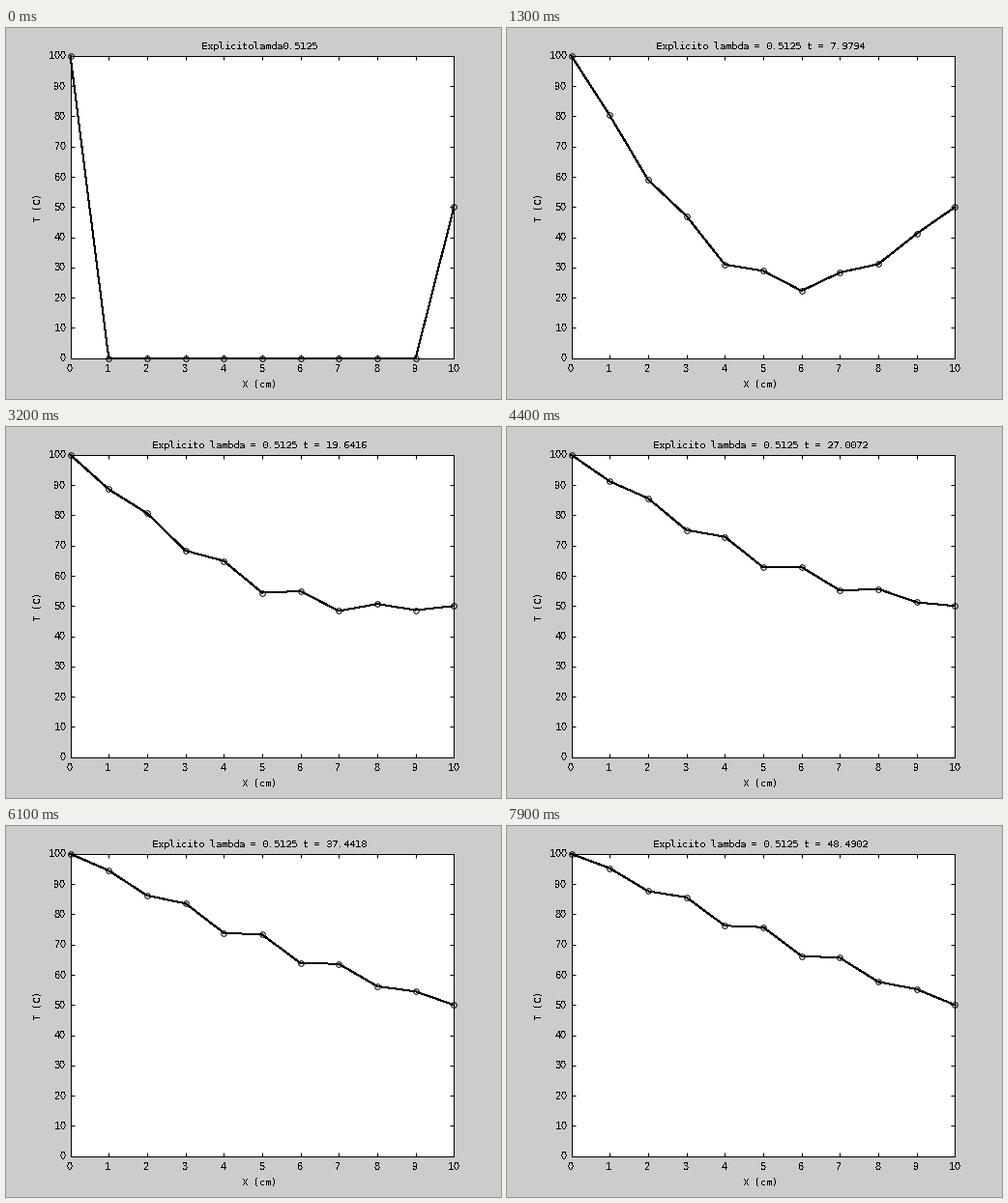
Animation, 512 px wide and 384 px high, one loop 8000 ms. Source, as a matplotlib script:

```python
import numpy as np
import matplotlib.pyplot as plt
from matplotlib.animation import FuncAnimation

W, H, DPI = 512, 384, 100
PX = 72 / DPI                      # one pixel in points
LEFT, RIGHT = 0.13 * W, 0.905 * W
TOP, BOTTOM = 0.075 * H, 0.89 * H
FRAMES, INTERVAL = 80, 100

DT = 0.6138                        # time step, s
LAMBDA = 0.835 * DT                # diffusivity * dt / dx^2

plt.rcParams.update({
    "text.antialiased": False,
    "text.hinting": "native",
    "text.hinting_factor": 1,
    "toolbar": "None",
})


def solve(steps):
    """Explicit finite differences for a rod with fixed end temperatures."""
    temp = np.zeros((steps, 11))
    temp[:, 0], temp[:, -1] = 100, 50
    for n in range(1, steps):
        old = temp[n - 1]
        temp[n, 1:-1] = old[1:-1] + LAMBDA * (old[2:] - 2 * old[1:-1] + old[:-2])
    return temp


def heading(n):
    if n == 0:
        return f"Explicitolamda{LAMBDA:.4f}"
    time = f"{n * DT:.4f}".rstrip("0").rstrip(".")
    return f"Explicito lambda = {LAMBDA:.4f} t = {time}"


fig = plt.figure(figsize=(W / DPI, H / DPI), dpi=DPI, facecolor="0.8")
ax = fig.add_axes([LEFT / W, 1 - BOTTOM / H,
                   (RIGHT - LEFT) / W, (BOTTOM - TOP) / H])
ax.set(xlim=(0, 10), ylim=(0, 100),
       xticks=range(11), yticks=range(0, 101, 10))
ax.tick_params(direction="in", top=True, right=True, length=4 * PX,
               width=PX, labelbottom=False, labelleft=False)
for spine in ax.spines.values():
    spine.set_linewidth(PX)


def label(x, y, text, size=10, font="DejaVu Sans Mono", ha="center", rotation=0):
    """Text on a baseline, placed in pixels from the top left."""
    return fig.text(x / W, 1 - y / H, text, fontsize=size * PX, family=font,
                    ha=ha, va="baseline", rotation=rotation,
                    rotation_mode="anchor")


digits = dict(size=11, font="Liberation Sans")
for i in range(11):
    label(LEFT + (RIGHT - LEFT) * i / 10 - 0.6, 356, str(i), **digits)
    label(62, BOTTOM - (BOTTOM - TOP) * i / 10 + 3.6, str(10 * i),
          ha="right", **digits)

label(262.4, 372, "X (cm)")
label(36, 186, "T (C)", rotation=90)
title = label(262.4, 22, "")

# Aliased strokes also fill every pixel they touch, so 1 px shows as 2.
temps = solve(FRAMES)
curve, = ax.plot(range(11), temps[0], "ko-", linewidth=PX,
                 markersize=5.6 * PX, markerfacecolor="none",
                 markeredgewidth=PX, antialiased=False,
                 clip_on=False, zorder=5)


def draw(n):
    curve.set_ydata(temps[n])
    title.set_text(heading(n))
    return curve, title


anim = FuncAnimation(fig, draw, frames=FRAMES, interval=INTERVAL,
                     repeat=True, repeat_delay=0, blit=False)
plt.show()
```
